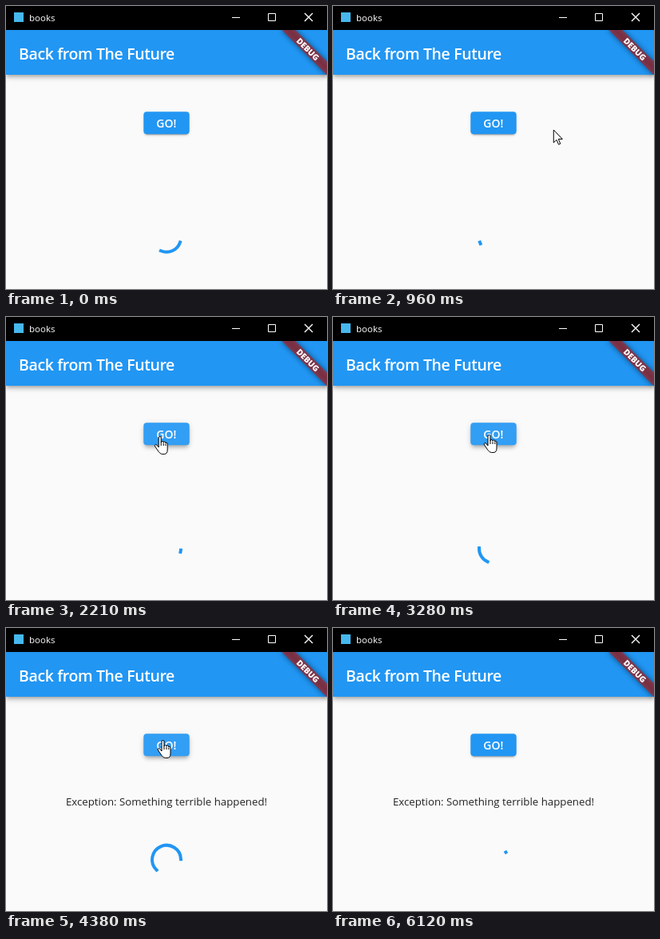
Recreate the animation shown at these times as an HTML page. Size 402x354 px, loop 6200 ms.

```html
<!DOCTYPE html>
<html lang="en">
<head>
<meta charset="utf-8">
<title>books</title>
<style>
html, body { margin: 0; width: 100%; height: 100%; overflow: hidden; background: #fafafa; }
body { position: relative; }
div, svg { position: absolute; }
svg { left: 0; top: 0; }
text { font-family: "Open Sans", "Noto Sans", sans-serif; }
#titlebar { left: 0; top: 0; width: 402px; height: 30px; background: #000; }
#appbar {
  left: 0; top: 30px; width: 402px; height: 56px; background: #2196f3;
  box-shadow: 0 2px 4px -1px #0003, 0 4px 5px #00000024, 0 1px 10px #0000001f;
}
#shadow { left: 173px; top: 133px; width: 56px; height: 27px; border-radius: 4px; background: #2196f3; }
</style>
</head>
<body>
<div id="appbar"></div>
<div id="titlebar"></div>
<div id="shadow"></div>
<svg width="402" height="354" viewBox="0 0 402 354">
  <defs>
    <clipPath id="app"><rect y="30" width="402" height="324"/></clipPath>
    <rect id="shape" x="172.3" y="132.25" width="57.4" height="28" rx="4"/>
    <clipPath id="button"><use href="#shape"/></clipPath>
    <filter id="blur" x="-30%" y="-150%" width="160%" height="400%"><feGaussianBlur stdDeviation="3.5"/></filter>
  </defs>
  <rect x="10" y="8" width="12" height="12" fill="#47b8ee"/>
  <text x="29" y="19" font-size="11.5" fill="#fff">books</text>
  <path d="M283 14.500h10M328.500 9.500h9v9h-9z" fill="none" stroke="#fff"/>
  <path d="M374 9l10 10m0-10l-10 10" stroke="#fff" stroke-width="1.4"/>
  <text x="16" y="67" font-size="19.5" font-weight="600" letter-spacing="-.38" fill="#fff">Back from The Future</text>
  <g clip-path="url(#app)">
    <g transform="translate(402 30) rotate(45)">
      <rect x="-40" y="28" width="80" height="12" opacity=".5" filter="url(#blur)"/>
      <rect x="-40" y="28" width="80" height="12" fill="#b71c1c" fill-opacity=".627"/>
      <text y="37.7" font-size="10.2" font-weight="800" text-anchor="middle" fill="#fff">DEBUG</text>
    </g>
  </g>
  <use href="#shape" fill="#2196f3"/>
  <use id="tint" href="#shape" fill="#fff"/>
  <circle id="splash" cx="194" cy="149" fill="#fff" clip-path="url(#button)"/>
  <text x="200.8" y="152" font-size="14" font-weight="600" text-anchor="middle" fill="#fff">GO!</text>
  <text id="message" x="201" y="222" font-size="13.25" text-anchor="middle" fill="#222">Exception: Something terrible happened!</text>
  <path id="spinner" fill="none" stroke="#2196f3" stroke-width="4" stroke-linecap="square"/>
  <g id="cursor" fill="#fff" stroke="#000" stroke-linejoin="round">
    <path id="arrow" d="M.5.5V16.500L4.200 13L6.800 18.800L9 17.800L6.500 12H11.500Z"/>
    <path id="hand" transform="translate(-7)" d="M5.500 14V2Q5.500.5 7 .5T8.500 2V8Q8.500 6.500 10 6.500T11.500 8Q11.500 7 13 7T14.300 9Q14.500 8.200 15.600 8.400T16.500 10V17Q16.500 22.500 12.500 22.500H10Q7.500 22.500 5.500 19.500L1 13Q.2 11 1.500 10.500T5.500 14M8.500 8V12M11.500 8.500V12M14.300 9.500V12"/>
  </g>
</svg>
<script>
const LOOP = 6200, CYCLE = 1265, CX = 201, CY = 289.75, R = 18;
const HOVER_IN = 1270, HOVER_OUT = 5440, CLICK = 1750, ERROR_AT = 3650;

// time, x, y of the pointer tip
const track = [
  [640, 404, 182], [960, 276, 154.5], [1270, 208, 146], [1500, 193, 149],
  [2680, 192.5, 149], [3280, 195.5, 147], [3370, 196, 146.5], [3700, 196.5, 140],
  [5390, 196.5, 140], [5480, 245, 150], [5560, 304, 160], [5600, 420, 170]
];

const $ = id => document.getElementById(id);
const clamp = v => Math.min(1, Math.max(0, v));
const show = (id, on) => $(id).setAttribute("visibility", on ? "visible" : "hidden");

// cubic-bezier(.4, 0, .2, 1)
function ease(x) {
  x = clamp(x);
  let lo = 0, hi = 1, s;
  for (let i = 0; i < 24; i++) {
    s = (lo + hi) / 2;
    const bx = 1.2 * s * (1 - s) ** 2 + 0.6 * s * s * (1 - s) + s ** 3;
    if (bx < x) lo = s; else hi = s;
  }
  return s * s * (3 - 2 * s);
}

function drawSpinner(t) {
  const turns = 0.146 + t / CYCLE, u = turns % 1;
  const head = ease(u * 2), tail = ease(u * 2 - 1);
  const start = -26 + 270 * tail + 90 * u + 216 * turns;
  const sweep = Math.max(270 * (head - tail), 0.06);
  const point = deg => {
    const a = deg * Math.PI / 180;
    return `${CX + R * Math.cos(a)} ${CY + R * Math.sin(a)}`;
  };
  $("spinner").setAttribute("d",
    `M${point(start)}A${R} ${R} 0 ${+(sweep > 180)} 1 ${point(start + sweep)}`);
}

function drawCursor(t) {
  const i = track.findIndex(k => k[0] > t);
  const moving = i > 0;
  const over = moving && t >= HOVER_IN && t < HOVER_OUT;
  show("arrow", moving && !over);
  show("hand", over);
  if (!moving) return;
  const [t0, x0, y0] = track[i - 1], [t1, x1, y1] = track[i];
  const k = (t - t0) / (t1 - t0);
  $("cursor").setAttribute("transform", `translate(${x0 + (x1 - x0) * k} ${y0 + (y1 - y0) * k})`);
}

function drawButton(t) {
  const hover = clamp((t - HOVER_IN) / 200) - clamp((t - HOVER_OUT) / 150);
  const age = t - CLICK;
  $("tint").setAttribute("opacity", 0.08 * hover);
  $("splash").setAttribute("r", 60 * clamp(age / 225));
  $("splash").setAttribute("opacity", 0.2 * (1 - clamp((age - 100) / 300)));
  $("shadow").style.boxShadow = `0 ${3 - hover}px ${1 + 3 * hover}px ${hover - 2}px #0003,
    0 ${2 + 2 * hover}px ${2 + 3 * hover}px #00000024, 0 1px ${5 + 5 * hover}px #0000001f`;
}

function frame() {
  const t = performance.now() % LOOP;
  drawSpinner(t);
  drawCursor(t);
  drawButton(t);
  show("message", t >= ERROR_AT);
  requestAnimationFrame(frame);
}
frame();
</script>
</body>
</html>
```
